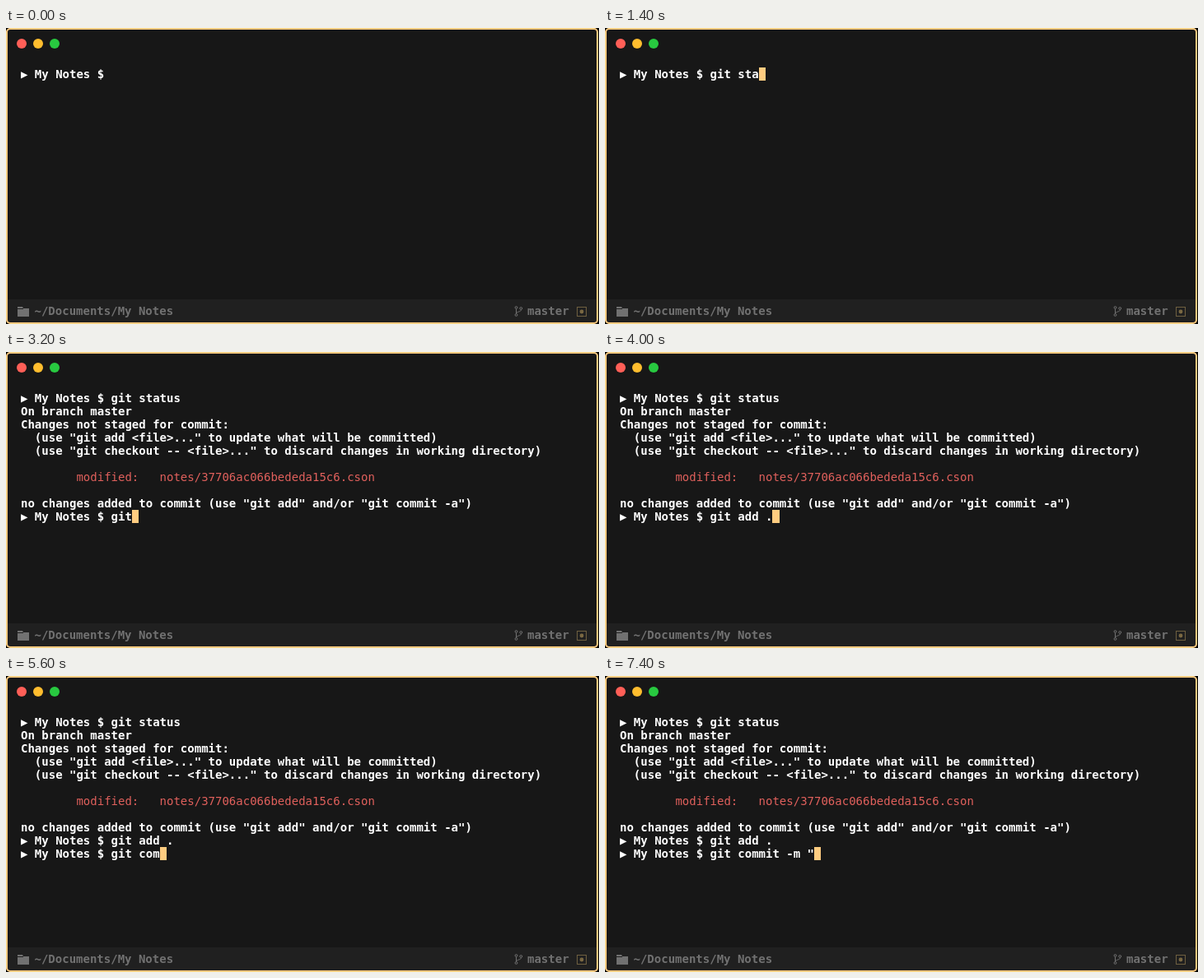
An HTML page for the animation above (8000 ms loop, 720x360 px).

```html
<!DOCTYPE html>
<html lang="en">
<head>
<meta charset="utf-8">
<title>Terminal session</title>
<style>
  html, body { margin: 0; width: 100%; height: 100%; overflow: hidden; background: #000; }
  svg { display: block; }
  text { font: bold 14px "DejaVu Sans Mono", monospace; white-space: pre; fill: #fff; }
  .red { font-weight: normal; fill: #e0605c; }
  .bar text { fill: #717171; }
</style>
</head>
<body>
<svg width="720" height="360" viewBox="0 0 720 360">
  <rect width="719" height="360" rx="5" fill="#171717"/>
  <circle cx="19" cy="19" r="6" fill="#ff5f57"/>
  <circle cx="39" cy="19" r="6" fill="#ffbd2e"/>
  <circle cx="59" cy="19" r="6" fill="#28c940"/>

  <g class="bar">
    <rect x="1" y="330" width="717" height="29" fill="#202020"/>
    <path d="M14 339h6l1 2h7v10H14z" fill="#717171"/>
    <path d="M14 341.5h7" stroke="#202020"/>
    <text x="34.5" y="349">~/Documents/My Notes</text>
    <g fill="none" stroke="#717171">
      <path d="M619.5 341.5v6M625.5 342.5c0 3-5.5 2-6 5"/>
      <circle cx="619.5" cy="340" r="1.4"/>
      <circle cx="625.3" cy="341" r="1.4"/>
      <circle cx="619.5" cy="349" r="1.4"/>
    </g>
    <text x="633" y="349">master</text>
    <rect x="693.5" y="339.5" width="11" height="11" fill="none" stroke="#6f6040"/>
    <circle cx="699" cy="345" r="2.4" fill="#7a6842"/>
  </g>

  <g id="screen"></g>
  <rect id="cursor" height="16" fill="#ffcc80"/>
  <rect x="1" y="1" width="717" height="358" rx="4" fill="none" stroke="#ffcc80" stroke-width="2"/>
</svg>
<script>
const LOOP = 8000, LEFT = 18, TOP = 48, ROW = 16, CHAR = 8.43;
const PROMPT = "▶ My Notes $ ";
const STATUS = [
  "On branch master",
  "Changes not staged for commit:",
  '  (use "git add <file>..." to update what will be committed)',
  '  (use "git checkout -- <file>..." to discard changes in working directory)',
  "",
  "        modified:   notes/37706ac066bededa15c6.cson",
  "",
  'no changes added to commit (use "git add" and/or "git commit -a")'
];

// keys: [time, number of characters typed so far]
const COMMANDS = [
  { start: 0, text: "git status", output: STATUS,
    keys: [[600, 1], [800, 2], [1000, 4], [1200, 5], [1400, 7], [1600, 8], [1800, 10]] },
  { start: 2000, text: "git add .", output: [],
    keys: [[2800, 1], [3000, 2], [3200, 3], [3400, 4], [3600, 6], [3800, 7], [4000, 9]] },
  { start: 4200, text: 'git commit -m "', output: [],
    keys: [[5000, 1], [5200, 3], [5400, 5], [5600, 7], [5800, 8], [6000, 10],
           [6200, 11], [6400, 12], [6600, 13], [7400, 15]] }
];

const screen = document.getElementById("screen");
const cursor = document.getElementById("cursor");
let shown = "";

function linesAt(t) {
  const lines = [];
  COMMANDS.filter(c => t >= c.start).forEach((c, i, active) => {
    const typed = c.keys.reduce((n, [time, count]) => t >= time ? count : n, 0);
    lines.push(PROMPT + c.text.slice(0, typed));
    if (i < active.length - 1) lines.push(...c.output);
  });
  return lines;
}

function drawLines(lines) {
  screen.replaceChildren(...lines.map((line, i) => {
    const el = document.createElementNS("http://www.w3.org/2000/svg", "text");
    el.setAttribute("x", LEFT);
    el.setAttribute("y", TOP + ROW * i + 13);
    if (line.includes("modified:")) el.setAttribute("class", "red");
    el.textContent = line;
    return el;
  }));
  const row = lines.length - 1;
  const x = LEFT + lines[row].length * CHAR, left = Math.round(x);
  cursor.setAttribute("x", left);
  cursor.setAttribute("y", TOP + ROW * row);
  cursor.setAttribute("width", Math.round(x + CHAR) - left);
}

function frame(now) {
  const t = now % LOOP;
  const lines = linesAt(t), key = lines.join("\n");
  if (key !== shown) {
    drawLines(lines);
    shown = key;
  }
  cursor.style.visibility = t < 200 ? "hidden" : "visible";
  requestAnimationFrame(frame);
}

const begin = performance.now();
const tick = () => frame(performance.now() - begin);
function frameLoop() {
  const t = (performance.now() - begin) % LOOP;
  render(t);
  requestAnimationFrame(frameLoop);
}
function render(t) {
  const lines = linesAt(t), key = lines.join("\n");
  if (key !== shown) {
    drawLines(lines);
    shown = key;
  }
  cursor.style.visibility = t < 200 ? "hidden" : "visible";
}
frameLoop();
</script>
</body>
</html>
```
